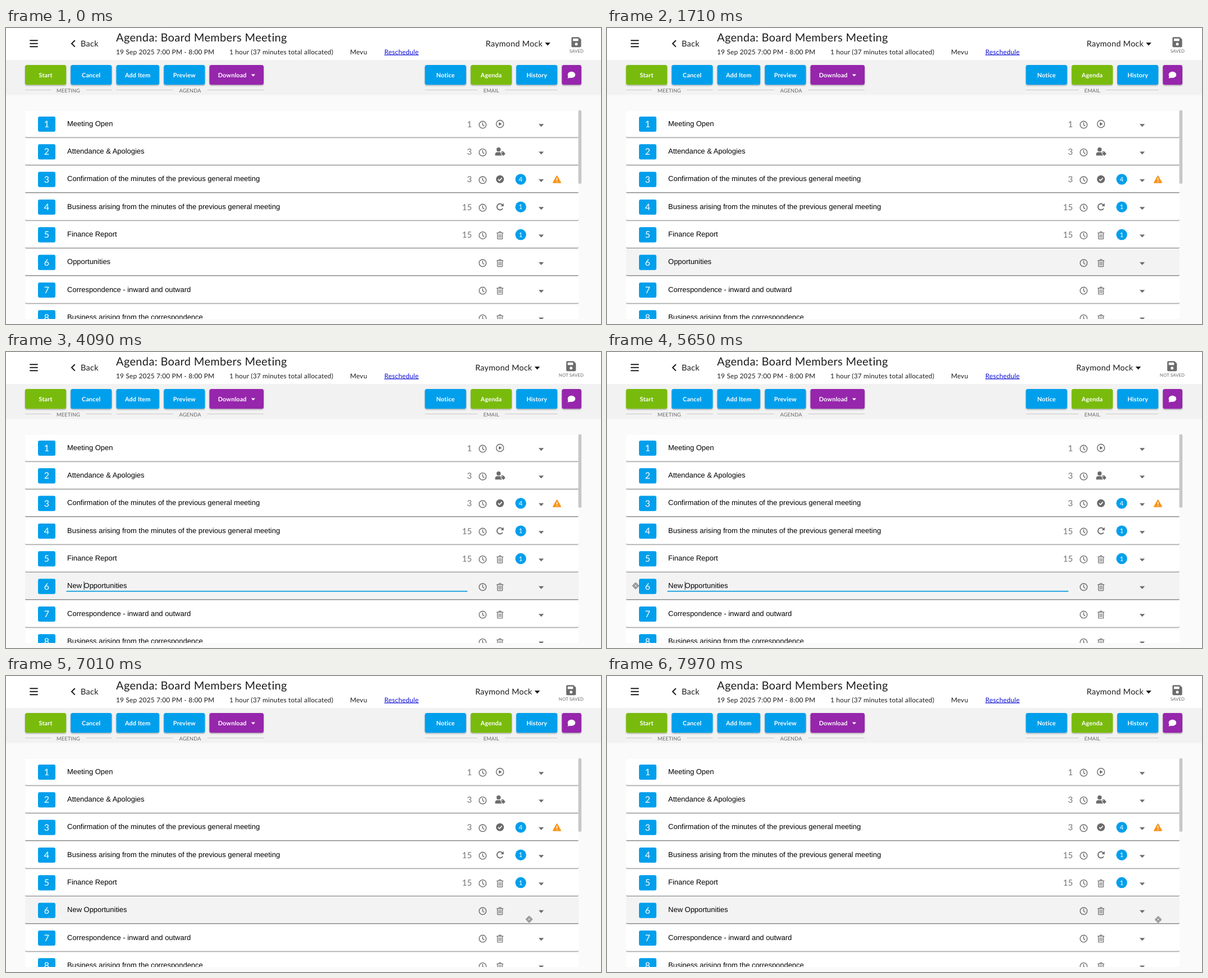
These frames come from a looping animation (1060x528 px, 8000 ms). An HTML page:

```html
<!DOCTYPE html>
<html lang="en">
<head>
<meta charset="utf-8">
<title>Meeting agenda</title>
<style>
  html, body { margin: 0; width: 100%; height: 100%; overflow: hidden; background: #fafafa; }
  svg { display: block; width: 1060px; height: 528px; }
  text { font-family: Lato, "Open Sans", sans-serif; letter-spacing: .017em; text-rendering: geometricPrecision; white-space: pre; }
  .item { font: 12.95px "Liberation Sans", Arial, sans-serif; letter-spacing: 0; }
  .mid { text-anchor: middle; }
  .end { text-anchor: end; }
  .bold { font-weight: 700; }
  .blue { fill: #009fec; }
  .green { fill: #79bb07; }
  .purple { fill: #9626ac; }
  .grey { fill: #6b6b6b; }
  .line { fill: none; stroke: #6b6b6b; stroke-width: 1.4; stroke-linecap: round; stroke-linejoin: round; }
</style>
</head>
<body>
<svg id="stage" viewBox="0 0 1060 528" xmlns="http://www.w3.org/2000/svg"></svg>
<script>
const LOOP = 8000, STEP = 80;
const TOP = 171.5, PITCH = 49.33;

const text = (x, y, s, size, fill = '#1c1c1c', cls = '') =>
  `<text x="${x}" y="${y}" font-size="${size}" fill="${fill}" class="${cls}">${s}</text>`;
const rect = (x, y, w, h, rx, attrs) =>
  `<rect x="${x}" y="${y}" width="${w}" height="${h}" rx="${rx}" ${attrs}/>`;
const path = (d, attrs) => `<path d="${d}" ${attrs}/>`;
const at = (x, y, body, attrs = '') => `<g transform="translate(${x} ${y})" ${attrs}>${body}</g>`;

const GREY = 'class="grey"', LINE = 'class="line"';

// Icons are drawn around their own centre.
const icons = {
  clock: `<circle r="6.3" ${LINE}/>` + path('M0-3.6V.3L2.4 2', LINE),
  play: `<circle r="6.6" ${LINE}/>` + path('M-2-3.2L3.4 0L-2 3.2Z', GREY),
  user: `<circle cx="-2.4" cy="-3.8" r="3.7" ${GREY}/>` +
    path('M-8.6 7V5Q-8.6 1-4.5 1H-.4Q1 1 1.4 1.6V4.4L4 7Z', GREY) +
    path('M2.5-.4H5.8L9.2 3.2Q9.7 3.8 9.2 4.4L6.7 7Q6.1 7.4 5.5 7L2.5 4Z', GREY) +
    '<circle cx="4.2" cy="1.4" r=".8" fill="#fff"/>',
  check: `<circle r="7.1" ${GREY}/>` +
    path('M-3.2.2L-.9 2.5L3.4-2.1', 'fill="none" stroke="#fff" stroke-width="1.7"'),
  redo: path('M4.6-3.3A5.5 5.5 0 1 0 4.3 3.6', 'class="line" style="stroke-width:1.9"') +
    path('M6.6-6.6V-1.2H1.2Z', GREY),
  trash: path('M-5.6-4.3H5.6M-2.3-4.5L-1.4-6.4H1.4L2.3-4.5M-4.5-4V5.4Q-4.5 6.5-3.4 6.5H3.4Q4.5 6.5 4.5 5.4V-4',
    'class="line" style="stroke-width:1.2"') +
    path('M-2.1-1.8V4.2M0-1.8V4.2M2.1-1.8V4.2', 'class="line" style="stroke-width:1"'),
  warn: path('M0-5.8L6.5 5.6H-6.5Z', 'fill="#f8951d" stroke="#f8951d" stroke-width="2" stroke-linejoin="round"') +
    path('M0-2.6V1.6M0 3.3V4.7', 'stroke="#fff" stroke-width="1.5"'),
  down: path('M-4.6-2.2H4.6L.6 2.3Q0 2.8-.6 2.3Z', GREY),
  save: path('M-8.6-7.2Q-8.6-9-6.8-9H4.4L8.6-4.8V7.2Q8.6 9 6.8 9H-6.8Q-8.6 9-8.6 7.2Z', GREY) +
    rect(-6, -6.6, 9.6, 4.6, .4, 'fill="#fff"') + '<circle cy="3.4" r="2.5" fill="#fff"/>',
  chat: '<ellipse cy="-.6" rx="6.8" ry="5.6" fill="#fff"/>' + path('M-5.6 1.2L-6.8 5.8L-1.4 4.4Z', 'fill="#fff"'),
};

const rows = [
  ['Meeting Open', 1, 'play'],
  ['Attendance &amp; Apologies', 3, 'user'],
  ['Confirmation of the minutes of the previous general meeting', 3, 'check', 4, true],
  ['Business arising from the minutes of the previous general meeting', 15, 'redo', 1],
  ['Finance Report', 15, 'trash', 1],
  ['Opportunities', '', 'trash'],
  ['Correspondence - inward and outward', '', 'trash'],
  ['Business arising from the correspondence', '', 'trash'],
];

function row([title, mins, icon, badge, warn], i) {
  let s = rect(-38.5, -23.5, 986, 46.4, 2, `id="card${i}" fill="#fff" filter="url(#cardShade)"`);
  s += rect(-15.5, -13.6, 31, 27.2, 3, 'class="blue"');
  s += text(0, 5.6, i + 1, 16, '#fff', 'mid');
  s += `<text x="36.6" y="3.2" class="item" id="title${i}">${title}</text>`;
  s += text(757.8, 5.2, mins, 15, '#757575', 'end');
  s += at(776.7, 1.1, icons.clock) + at(807.5, icon === 'trash' ? 1 : -.4, icons[icon]);
  if (badge) s += `<circle cx="844.5" cy="-.3" r="9.7" class="blue"/>` + text(844.5, 3.7, badge, 11.5, '#fff', 'mid');
  s += at(881, 1.9, icons.down);
  if (warn) s += at(909, -.1, icons.warn);
  return at(72.5, TOP + PITCH * i, s);
}

const button = (x, w, color, label, dx = 0) =>
  rect(x, 66, w, 35.3, 3.5, `class="${color}" filter="url(#btnShade)"`) +
  text(x + w / 2 + dx, 87.8, label, 10.8, '#fff', 'mid bold');

const group = (x1, x2, gap1, gap2, label) =>
  path(`M${x1} 110.5H${gap1}M${gap2} 110.5H${x2}`, 'stroke="#c9c9c9"') +
  text((gap1 + gap2) / 2, 114.8, label, 9.2, '#666', 'mid');

const shade = (id, dy, blur, alpha) =>
  `<filter id="${id}" x="-10%" y="-20%" width="120%" height="150%"><feDropShadow dx="0" dy="${dy}" stdDeviation="${blur}" flood-color="#000" flood-opacity="${alpha}"/></filter>`;

const stage = document.getElementById('stage');
stage.innerHTML =
  `<defs>${shade('cardShade', 1.3, .7, .5)}${shade('btnShade', 1.3, 1.1, .36)}
   <clipPath id="list"><rect y="120" width="1060" height="399"/></clipPath></defs>` +
  rect(0, 0, 1060, 528, 0, 'fill="#fafafa"') +
  rect(0, 57, 1060, 62.5, 0, 'fill="#f2f2f2"') +
  rect(0, 0, 1060, 57, 0, 'fill="#fff"') +
  path('M42.3 22.3H56.7M42.3 27.8H56.7M42.3 33.3H56.7', 'stroke="#1c1c1c" stroke-width="2"') +
  path('M122.8 22L117 27.8L122.8 33.6', 'fill="none" stroke="#1c1c1c" stroke-width="2"') +
  text(133, 32.8, 'Back', 14.5) +
  text(196, 24.4, 'Agenda: Board Members Meeting', 20) +
  text(196, 46.5, '19 Sep 2025 7:00 PM - 8:00 PM', 11.85) +
  text(398, 46.5, '1 hour (37 minutes total allocated)', 11.85) +
  text(613, 46.5, 'Mevu', 11.85) +
  text(674, 46.5, 'Reschedule', 11.85, '#1212d8" text-decoration="underline') +
  '<g id="account">' +
    text(101, 32.8, 'Raymond Mock', 14.4, '#1c1c1c', 'end') +
    path('M105.2 26H114.8L110 31.6Z', 'fill="#1c1c1c"') + '</g>' +
  at(1016, 25.3, icons.save, 'id="disk"') +
  '<text id="status" x="1029" y="44.4" font-size="7.8" fill="#666" class="end"></text>' +
  button(34, 73.2, 'green', 'Start') +
  button(115.2, 73.2, 'blue', 'Cancel') +
  button(196.5, 76.5, 'blue', 'Add Item') +
  button(281.2, 73.2, 'blue', 'Preview') +
  button(362.4, 96.6, 'purple', 'Download', -7.5) +
  path('M436.8 82.4H444L440.4 86.6Z', 'fill="#fff"') +
  button(746.3, 73.4, 'blue', 'Notice') +
  button(827.8, 73.2, 'green', 'Agenda') +
  button(909, 73.2, 'blue', 'History') +
  button(990.3, 34.7, 'purple', '') + at(1007.4, 84, icons.chat) +
  group(34, 188.5, 80, 142, 'MEETING') +
  group(196.5, 459, 297.5, 358.5, 'AGENDA') +
  group(746.5, 982.5, 840, 889, 'EMAIL') +
  `<g clip-path="url(#list)">${rows.map(row).join('')}</g>` +
  rect(1019.6, 146.8, 5.6, 131, 2, 'fill="#c7c7c7"') +
  '<g id="focus">' + rect(107.5, 425.9, 714.5, 1.7, 0, 'fill="#069bdd"') + '</g>' +
  rect(0, 409.5, 1, 14.5, 0, 'id="caret" fill="#222"') +
  '<g id="move">' +
    path('M0-6L2.2-3.4H-2.2ZM0 6L2.2 3.4H-2.2ZM-6 0L-3.4-2.2V2.2ZM6 0L3.4-2.2V2.2Z',
      'fill="#fff" stroke="#555" stroke-width=".9"') +
    '<circle r="2" fill="#fff" stroke="#555" stroke-width="1"/>' +
    path('M-3.6-3.6L-2-2M3.6-3.6L2-2M-3.6 3.6L-2 2M3.6 3.6L2 2', 'stroke="#777" stroke-width=".9"') + '</g>' +
  '<g id="arrow">' +
    path('M0 0V9L1.9 7.3L3.2 10.4L4.5 9.8L3.2 6.8H5.6Z', 'fill="#fff" stroke="#444" stroke-width=".8"') + '</g>';

const el = id => document.getElementById(id);
const show = (id, on) => el(id).setAttribute('display', on ? 'inline' : 'none');
const move = (id, x, y) => el(id).setAttribute('transform', `translate(${x} ${y})`);
const within = (t, a, b) => t >= a && t < b;
// Value of the last entry whose time has come.
const latest = (list, t) => list.filter(e => e[0] <= t).pop()[1];

// Pointer strokes: start, end, corner points [x, y], and the steps between which it is an arrow.
const strokes = [
  { from: 1230, to: 1470, pts: [[1031, 467], [985, 438], [880, 421]], arrow: [0, 1] },
  { from: 1550, to: 1710, pts: [[81, 419], [92, 418]] },
  { from: 5490, to: 6210, pts: [[95, 418], [70, 417], [51, 417], [35, 417], [25, 416], [21, 415], [19, 414]], arrow: [4, 9] },
  { from: 6210, to: 6450, pts: [[30, 412], [58, 405], [95, 398]], arrow: [0, 1] },
  { from: 6690, to: 7570, pts: [[847, 434], [866, 436], [888, 437], [911, 436], [932, 434],
    [950, 431], [965, 426], [977, 420], [985, 414], [987.5, 410.5], [987.5, 411]], arrow: [7, 11] },
  { from: 7570, to: 8000, pts: [[987, 413], [986, 418], [985, 423], [984, 429], [983, 432], [982, 434.5]], arrow: [0, 3] },
];

const typed = [[0, ''], [3690, 'N'], [3850, 'Ne'], [4090, 'New ']];
const caretX = { '': 109.1, 'N': 118.4, 'Ne': 125.6, 'New ': 138.6 };
const caretOn = [[0, false], [2370, true], [2950, false], [3440, true], [4680, false], [5170, true], [5730, false]];
const saveState = [[0, ['SAVED', 0]], [3690, ['NOT SAVED', 18.6]], [7090, ['SAVING', 3.4]], [7650, ['SAVED', 0]]];
const hovered = [[0, false], [1310, true], [5810, false], [6290, true]];

function draw(t) {
  const lead = latest(typed, t);
  el('title5').textContent = lead + 'Opportunities';
  el('caret').setAttribute('x', caretX[lead]);
  show('caret', latest(caretOn, t));
  show('focus', within(t, 2370, 5890));
  el('card5').setAttribute('fill', latest(hovered, t) ? '#f3f3f3' : '#fff');

  const [label, shift] = latest(saveState, t);
  el('status').textContent = label;
  move('account', 858 - shift - 3, 0);
  move('disk', 1016 - shift / 2, 25.3);

  const s = strokes.find(s => within(t, s.from, s.to));
  show('move', false);
  show('arrow', false);
  if (!s) return;
  const n = Math.floor((t - s.from) / STEP);
  const [x, y] = s.pts[Math.min(n, s.pts.length - 1)];
  const kind = s.arrow && within(n, ...s.arrow) ? 'arrow' : 'move';
  move(kind, x, y);
  show(kind, true);
}

const start = performance.now();
function tick(now) {
  draw(Math.max(0, now - start) % LOOP);
  requestAnimationFrame(tick);
}
draw(0);
requestAnimationFrame(tick);
</script>
</body>
</html>
```
